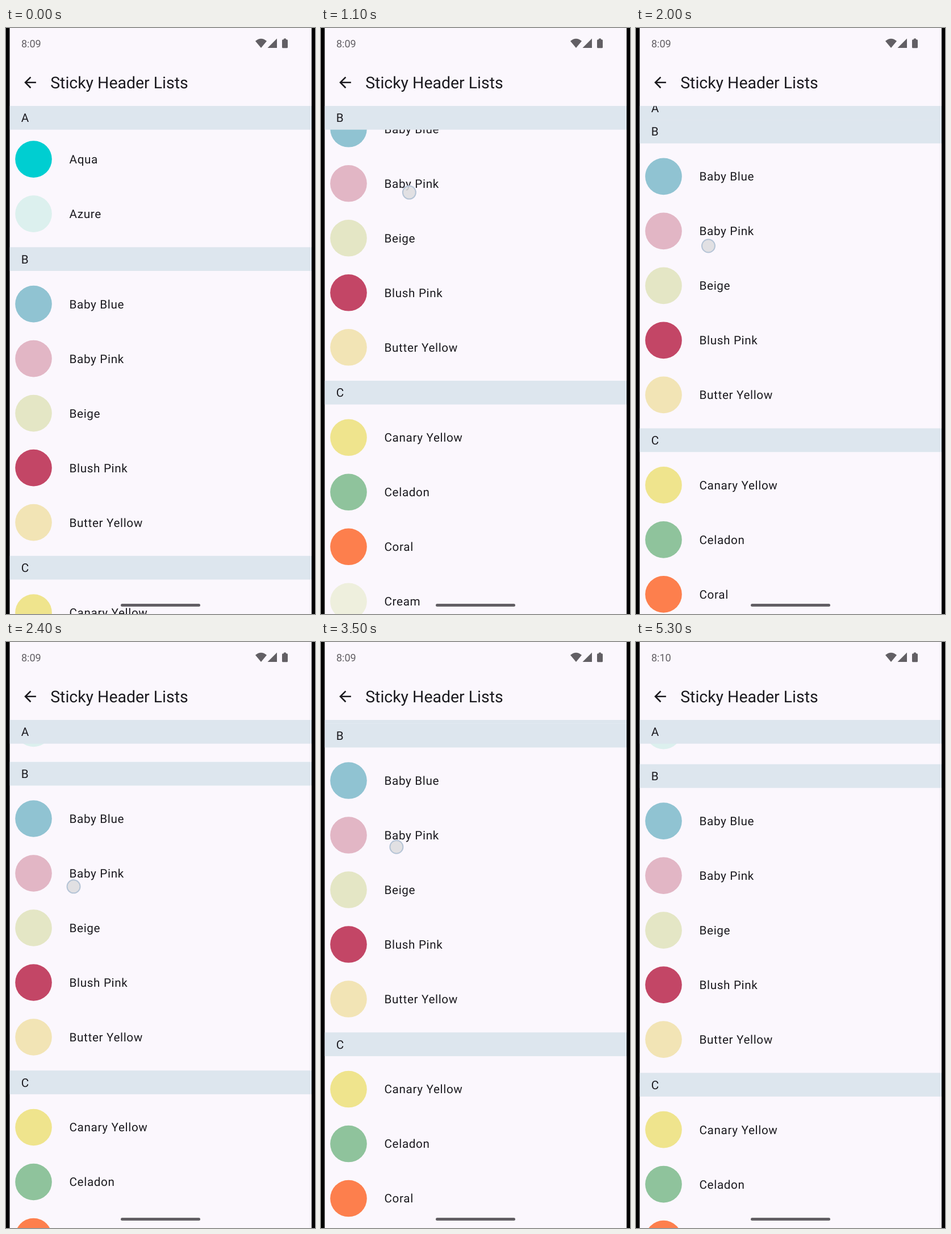
Recreate the animation shown at these times as an HTML page. Size 544 by 1030 pixels, loop 5400 ms.

```html
<!DOCTYPE html>
<html lang="en">
<head>
<meta charset="utf-8">
<title>Sticky Header Lists</title>
<style>
  html, body { margin: 0; width: 100%; height: 100%; overflow: hidden; background: #000; }
  svg { display: block; width: 544px; height: 1030px; }
  text { font-family: Roboto, sans-serif; fill: #1b1a1f; text-rendering: geometricPrecision; }
  .item { font-size: 20.69px; letter-spacing: .647px; }
  .title { font-size: 28.45px; }
  .clock { font-size: 18.1px; fill: #625f64; }
  .icon { fill: #625f64; }
</style>
</head>
<body>
<svg viewBox="0 0 544 1030">
  <defs><clipPath id="viewport"><rect x="6.5" y="137" width="531.5" height="893"/></clipPath></defs>
  <rect width="544" height="1030"/>
  <rect x="6.5" width="531.5" height="1030" fill="#fbf7fd"/>
  <text id="clock" class="clock" x="26.9" y="33.5">8:09</text>
  <g class="icon">
    <path d="M439 23Q449 14.5 459 23L449 35Z"/>
    <path d="M477 18.5V35H460.5Z"/>
    <path d="M489 18.5h4v1.700h1.500a1.500 1.500 0 0 1 1.500 1.500v12a1.500 1.500 0 0 1-1.500 1.500h-7a1.500 1.500 0 0 1-1.500-1.500v-12a1.500 1.500 0 0 1 1.500-1.500h1.500z"/>
  </g>
  <path transform="translate(27 80.3) scale(1.293)" fill="#1b1a1f"
    d="M20 11H7.830l5.590-5.590L12 4l-8 8 8 8 1.410-1.410L7.830 13H20z"/>
  <text class="title" x="78.2" y="105.5">Sticky Header Lists</text>
  <g clip-path="url(#viewport)">
    <g id="rows"></g>
    <g id="headers"></g>
  </g>
  <rect x="202" y="1012" width="140" height="5" rx="2.5" fill="#625f64"/>
  <circle id="touch" r="11.5" fill="#dddddf" fill-opacity=".87" stroke="#b5c4d6" stroke-width="2"/>
</svg>
<script>
const LOOP = 5400, STEP = 100;
const LIST_TOP = 137, FIRST_HEADER = 130.8, HEADER_H = 41.7;
const ROW_H = 96, HEADER_TO_ROW = 99.8, ROW_TO_HEADER = 58.7;
const TOUCH_LEAD = 25;

const sections = [
  { letter: 'A', rows: [['Aqua', '#00ced1'], ['Azure', '#dcf0ee']] },
  { letter: 'B', rows: [['Baby Blue', '#90c3d2'], ['Baby Pink', '#e2b6c5'],
    ['Beige', '#e4e6c5'], ['Blush Pink', '#c34666'], ['Butter Yellow', '#f2e4b5']] },
  { letter: 'C', rows: [['Canary Yellow', '#efe48d'], ['Celadon', '#8fc39c'],
    ['Coral', '#fd7f4d'], ['Cream', '#eeefdd']] }
];

// Where the drag turns around: time, scroll offset
const turns = [[458, 0], [1200, 322], [2550, 170], [3675, 246], [4420, 170.5]];

const byId = id => document.getElementById(id);

function add(parent, tag, attrs, text = '') {
  const node = document.createElementNS('http://www.w3.org/2000/svg', tag);
  for (const name in attrs) node.setAttribute(name, attrs[name]);
  node.textContent = text;
  return parent.appendChild(node);
}

function move(node, x, y) {
  node.setAttribute('transform', `translate(${x} ${y})`);
}

let top_ = FIRST_HEADER;
for (const section of sections) {
  section.top = top_;
  section.rows.forEach(([name, fill], i) => {
    const y = section.top + HEADER_TO_ROW + i * ROW_H;
    add(byId('rows'), 'circle', { cx: 48.5, cy: y, r: 32.3, fill });
    add(byId('rows'), 'text', { class: 'item', x: 111.5, y: y + 7.4 }, name);
  });
  top_ += HEADER_TO_ROW + (section.rows.length - 1) * ROW_H + ROW_TO_HEADER;
  section.node = add(byId('headers'), 'g', {});
  add(section.node, 'rect', { x: 6.5, width: 531.5, height: HEADER_H, fill: '#dde6ee' });
  add(section.node, 'text', { class: 'item', x: 26.8, y: 28.3 }, section.letter);
}

// Each leg between two turns eases in and out
function scrollAt(t) {
  let offset = 0;
  for (let i = 1; i < turns.length; i++) {
    const [t0, from] = turns[i - 1], [t1, to] = turns[i];
    const u = Math.min(Math.max((t - t0) / (t1 - t0), 0), 1);
    offset += (to - from) * (1 - Math.cos(Math.PI * u)) / 2;
  }
  return offset;
}

function render(t) {
  const scroll = scrollAt(t);
  move(byId('rows'), 0, -scroll);
  sections.forEach((section, i) => {
    const next = sections[i + 1];
    const limit = next ? next.top - scroll - HEADER_H : Infinity;
    move(section.node, 0, Math.min(Math.max(section.top - scroll, LIST_TOP), limit));
  });
  // The finger runs slightly ahead of the list, on a curved path
  const touch = byId('touch');
  const y = 603 - scrollAt(t + TOUCH_LEAD);
  move(touch, 113 + 0.00083 * Math.max(515 - y, 0) ** 2, y);
  touch.setAttribute('visibility', t >= 100 && t <= 4300 ? 'visible' : 'hidden');
  byId('clock').textContent = t < 4800 ? '8:09' : '8:10';
}

const start = performance.now();
function tick() {
  const elapsed = (performance.now() - start) % LOOP;
  render(Math.floor(elapsed / STEP) * STEP);
  requestAnimationFrame(tick);
}
tick();
</script>
</body>
</html>
```
